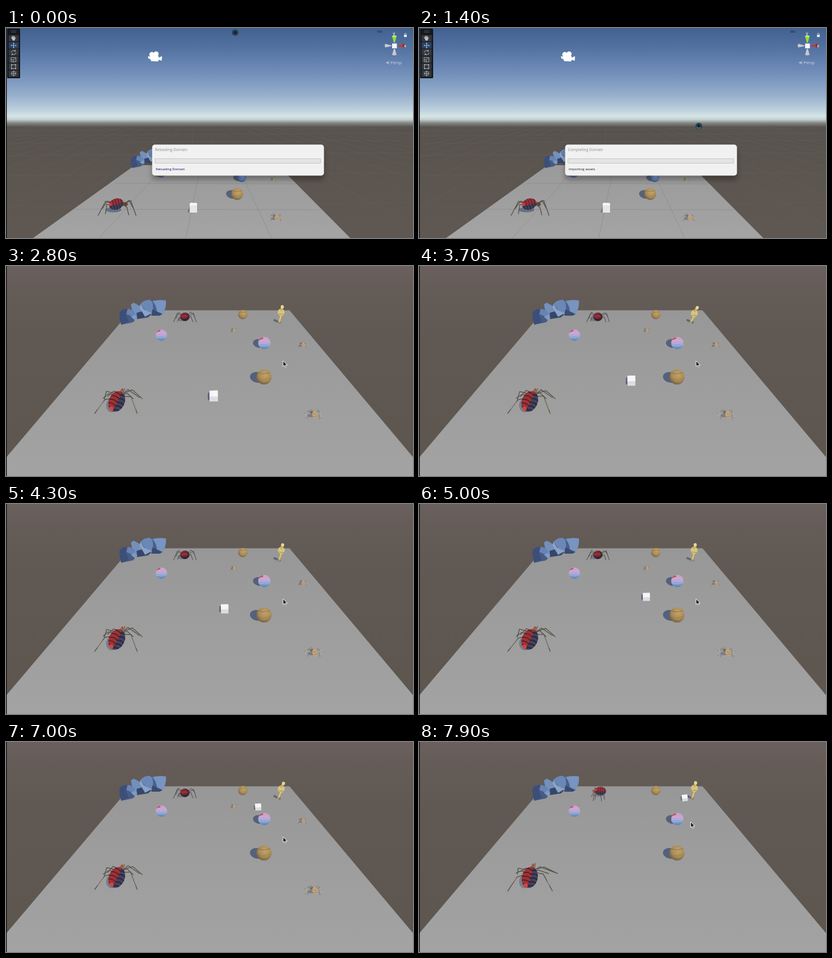
An HTML page for the animation above (8000 ms loop, 720 by 372 pixels).

```html
<!DOCTYPE html>
<html lang="en">
<head>
<meta charset="utf-8">
<title>Editor to play mode</title>
<style>
html, body { margin: 0; width: 100%; height: 100%; overflow: hidden; background: #5f5751; }
svg { display: block; width: 720px; height: 372px; }
text { font-family: "Open Sans", "Noto Sans", sans-serif; }
</style>
</head>
<body>
<svg id="stage" viewBox="0 0 720 372" xmlns="http://www.w3.org/2000/svg"></svg>
<script>
const LOOP = 8000, STEP = 100, CUT = 1900;
const stage = document.getElementById('stage');
const updates = [];

function add(parent, tag, attrs) {
  const el = document.createElementNS('http://www.w3.org/2000/svg', tag);
  for (const k in attrs) el.setAttribute(k, attrs[k]);
  parent.appendChild(el);
  return el;
}
const group = (p, x, y, s = 1, r = 0) =>
  add(p, 'g', { transform: `translate(${x} ${y}) rotate(${r}) scale(${s})` });
const path = (p, d, fill, more) => add(p, 'path', { d, fill, ...more });
const line = (p, d, stroke, w, more) =>
  path(p, d, 'none', { stroke, 'stroke-width': w, 'stroke-linecap': 'round', 'stroke-linejoin': 'round', ...more });
const oval = (p, cx, cy, rx, ry, fill, more) => add(p, 'ellipse', { cx, cy, rx, ry, fill, ...more });
const rect = (p, x, y, width, height, fill, more) => add(p, 'rect', { x, y, width, height, fill, ...more });
const show = (el, on) => el.setAttribute('display', on ? 'inline' : 'none');
const clamp = v => Math.max(0, Math.min(1, v));
const mix = (a, b, k) => a + (b - a) * k;
const ease = k => k * k * (3 - 2 * k);
const span = (t, a, b) => ease(clamp((t - a) / (b - a)));

const defs = add(stage, 'defs', {});
function gradient(tag, id, attrs, stops) {
  const g = add(defs, tag, { id, ...attrs });
  stops.forEach(([offset, c]) => add(g, 'stop', { offset, 'stop-color': c }));
}
const down = { x1: 0, y1: 0, x2: 0, y2: 1 };
const lit = { cx: .58, cy: .35, r: .72 };
gradient('linearGradient', 'sky', down, [
  [0, '#42618f'], [.1, '#5473a2'], [.22, '#7390ba'], [.32, '#97afcc'], [.39, '#bdd0dd'],
  [.42, '#d5e5e6'], [.436, '#c3d0d0'], [.452, '#858885'], [.472, '#57524e'], [.6, '#5a544f'], [1, '#5f5852']]);
gradient('linearGradient', 'dusk', down, [
  [0, '#6a605e'], [.1, '#655c58'], [.22, '#625a55'], [.34, '#605852'], [1, '#5d564f']]);
gradient('linearGradient', 'floor', down, [[0, '#979797'], [.35, '#9c9c9c'], [1, '#a3a3a3']]);
gradient('linearGradient', 'floorEdit', down, [[0, '#9a9a9a'], [1, '#a4a4a4']]);
gradient('radialGradient', 'gold', lit, [[0, '#c2a46c'], [.6, '#a98a55'], [1, '#66563f']]);
gradient('linearGradient', 'candy', down, [[0, '#d0a5c6'], [.4, '#c5a2d2'], [.6, '#8fabda'], [1, '#5d83b2']]);
gradient('radialGradient', 'blueBall', lit, [[0, '#86a5d4'], [.6, '#5f7fb4'], [1, '#374b72']]);
add(add(defs, 'filter', { id: 'soft', x: '-20%', y: '-60%', width: '140%', height: '240%' }),
  'feGaussianBlur', { stdDeviation: 5 });
const bodyClip = add(defs, 'clipPath', { id: 'body' });
oval(bodyClip, 0, 0, 14, 19);
const ballClip = add(defs, 'clipPath', { id: 'ball' });
oval(ballClip, 0, 0, 10, 10);
const SHADOW = '#4f5b75';

// Props shared by both views

function ball(p, x, y, r, kind, cast = true) {
  const g = group(p, x, y, r / 10);
  if (cast) oval(g, -8.5, 2.5, 10, 7, SHADOW, { transform: 'rotate(12)', opacity: .9 });
  oval(g, 0, 0, 10, 10, `url(#${kind})`);
  const c = add(g, 'g', { 'clip-path': 'url(#ball)' });
  if (kind === 'gold') {
    line(c, 'M-8 -6Q-1 -2 8 -6', '#7d6540', .8, { opacity: .7 });
    line(c, 'M-10 2Q0 6 10 1', '#856c45', .6, { opacity: .5 });
  } else if (kind === 'candy') {
    [-5, -1, 3].forEach(v => line(c, `M-10 ${v}Q0 ${v + 4} 10 ${v - 1}`, '#e2b6da', .9, { opacity: .55 }));
    line(c, 'M-8 -6Q-6 -8 -3 -8', '#b84a62', 2.4);
  }
}

// Each leg: hip, knee, foot
function legs(p, rows, color, w, rate, turn) {
  rows.forEach(([hx, hy, kx, ky, fx, fy], i) => {
    const el = line(p, '', color, w);
    updates.push(t => {
      const a = Math.sin(t / rate + i * 1.3) * .7, k = turn(t);
      const x = kx + a * .8 - k * 2, y = ky + a + k * 2;
      const ex = fx + k * (fx > 0 ? 4 : 0), ey = fy + k * (fy > 15 ? 3 : -2);
      el.setAttribute('d', `M${hx - k * 3} ${hy}L${x} ${y}L${ex} ${ey}`);
    });
  });
}

// Red on the left, navy on the right, with dark bands
function stripes(p) {
  const g = add(p, 'g', { 'clip-path': 'url(#body)' });
  oval(g, 0, 0, 14, 19, '#39405c');
  path(g, 'M-15 -20H1Q4 0 -2 20H-15Z', '#a32f33');
  for (let v = -14; v < 20; v += 7) {
    line(g, `M-15 ${v + 2}Q-6 ${v - 3} 1 ${v + 1}`, '#3a2630', 1.7);
    line(g, `M1 ${v + 1}Q8 ${v - 3} 15 ${v + 2}`, '#20253a', 1.7);
    line(g, `M2 ${v - 2}Q7 ${v - 5} 12 ${v - 3}`, '#6b3b4e', 1.2);
  }
  oval(g, -4, 16, 4, 4.5, '#d8433a');
}

const still = () => 0;
const late = t => span(t, 7000, 7500);

function bigSpider(p, x, y) {
  const g = group(p, x, y);
  oval(g, -9, 7, 10, 12, SHADOW, { opacity: .5 });
  legs(g, [
    [8, -13, 28, -20, 45, -5], [9, -12, 20, -21, 40, -7], [10, -9, 25, -9, 36, 21],
    [7, -11, 18, -15, 29, -5], [4, -12, -18, -18, -22, -4], [3, -10, -14, -13, -24, -6],
    [2, -8, -21, -3, -39, 21], [6, -15, -6, -19, -16, -9]
  ], '#55534b', 1.4, 260, late);
  line(g, 'M27 -5L34 14M-24 1L-34 14', '#a1937a', 1);
  const body = add(g, 'g', {});
  oval(body, 9, -17, 4, 5.5, '#8f6a4d', { transform: 'rotate(18 9 -17)' });
  line(body, 'M10 -20L9.500 -23M13 -20L14 -23', '#a43a3a', 1.3);
  stripes(group(body, 0, 0, 1, 23));
  updates.push(t => body.setAttribute('transform', `rotate(${-11 * late(t) + Math.sin(t / 300)})`));
}

function tinySpider(p, x, y, s, rate = 190) {
  const g = group(p, x, y, s);
  oval(g, -6, 2, 6, 3, SHADOW, { opacity: .5 });
  legs(g, [
    [-3, -1, -13, -6, -16, 6], [-3, -2, -8, -8, -17, -2], [-3, 1, -10, 0, -12, 8], [-1, -3, -5, -9, -9, -5],
    [3, -1, 11, -5, 13, 7], [3, -2, 7, -8, 13, -1], [3, 1, 9, 1, 10, 8]
  ], '#817a74', 1, rate, still);
  line(g, 'M-13 -6L-16 4M11 -5L13 5', '#d3c2ad', .9);
  oval(g, -4, -4, 3, 2.5, '#7c6350');
  oval(g, 1.5, 1, 5, 6.4, '#c3a67c', { transform: 'rotate(-25)' });
  line(g, 'M-2 -1Q1 -3 5 1M-1 4Q2 2 6 4', '#8f7354', .8);
  return g;
}

function darkSpider(p, x, y, s = 1) {
  const g = group(p, x, y, s);
  oval(g, -6, 4, 7, 4, SHADOW, { opacity: .5 });
  legs(g, [
    [-4, 0, -13, -6, -20, 9], [-4, -2, -11, -8, -16, 3], [-4, 2, -10, 0, -13, 8], [4, 0, 15, -7, 20, 9],
    [4, -2, 11, -8, 17, -1], [4, 2, 11, 0, 14, 9]
  ], '#4c4a47', 1, 240, still);
  oval(g, 0, 0, 8.3, 7.6, '#4a2630');
  oval(g, -1, -1.5, 6, 5, '#9c2d35');
  line(g, 'M-6 3Q0 0 6 3M-5 -3Q0 -6 5 -3', '#392231', 1.1);
  oval(g, 0, 5.5, 3.5, 1.8, '#2a2330');
  return g;
}

// The same spider seen from the side
function sideSpider(p, x, y) {
  const g = group(p, x, y);
  oval(g, -2, 6, 10, 3, SHADOW, { opacity: .4 });
  legs(g, [
    [-5, 0, -9, -8, -12, 16], [-4, 1, -11, 1, -15, 9], [0, 3, 2, 7, 3, 17], [-5, 1, -7, 5, -9, 14], [5, 2, 7, 6, 8, 14]
  ], '#55514b', 1, 240, still);
  oval(g, -9, -1, 4, 3, '#96523f');
  stripes(group(g, 1, -1, .54, 90));
  return g;
}

const rockArt = [
  ['M20 9L25 6Q36 11 43 19L47 31L30 35L23 24Z', '#7390bd'],
  ['M30 24L44 20L56 27L50 32L31 35Z', '#35466a'],
  ['M37 8Q44 0 53 1Q60 4 60 13L57 24L46 20Z', '#6a88b7'],
  ['M37 8L43 18L56 25L45 31L35 14Z', '#8aa3c8'],
  ['M58 3Q70 0 82 2Q83 16 76 26L66 22Q65 11 58 3Z', '#7894c0'],
  ['M58 3Q65 11 66 22L60 20Z', '#48608e'],
  ['M58 18L76 26L71 29L56 29Z', '#394b70'],
  ['M0 23Q5 16 14 17Q25 17 28 28Q29 38 23 41L3 45Q-1 34 0 23Z', '#475b85'],
  ['M0 23Q5 16 14 17L11 27L16 40L3 45Q-1 34 0 23Z', '#3c4f78'],
  ['M14 17Q25 17 28 28L21 30L12 26Z', '#6884b2'],
  ['M20 31L27 27L31 32L27 37Z', '#7f9ac4']
];
function rocks(p, x, y, s = 1) {
  const g = group(p, x, y, s);
  rockArt.forEach(([d, c]) => path(g, d, c));
}

function dancer(p, x, y, s) {
  const g = group(p, x, y, s);
  line(g, 'M0 0L-9 -4', SHADOW, 4, { opacity: .8 });
  const leg = line(g, '', '#b59c58', 4.2), shin = line(g, '', '#e0cc89', 2);
  const torso = oval(g, 0, 0, 6, 6.5, '#d8c47c'), belt = line(g, '', '#a68f52', 1.2);
  const neck = line(g, '', '#c2aa64', 3.4), head = oval(g, 0, 0, 2.8, 3.2, '#e8d68d');
  updates.push(t => {
    const b = Math.max(0, Math.cos((t - 3700) / 3000 * Math.PI * 2)) ** 2;
    const sway = Math.sin(t / 170) * .4, tx = 3 + sway, ty = mix(-18, -16, b);
    const hx = mix(5, 8, b) + sway, hy = mix(-27.5, -26, b), fx = mix(-1, -3, b);
    leg.setAttribute('d', `M${tx - 1} ${ty + 5}L${fx + 2} -5L${fx} -1`);
    shin.setAttribute('d', `M${tx} ${ty + 5}L${fx + 1} -3`);
    torso.setAttribute('transform', `translate(${tx} ${ty}) rotate(${mix(4, 24, b)})`);
    belt.setAttribute('d', `M${tx - 4} ${ty + 3}L${tx + 4} ${ty + 4}`);
    neck.setAttribute('d', `M${tx} ${ty - 4}L${hx} ${hy}`);
    head.setAttribute('transform', `translate(${hx} ${hy}) rotate(${25 * b})`);
  });
}

// Editor view

const edit = add(stage, 'g', {});
rect(edit, 0, 0, 720, 372, 'url(#sky)');
const far = add(edit, 'g', { opacity: .28 });
for (let i = -14; i <= 14; i++) line(far, `M${330 + i * 18} 172L${330 + i * 145} 372`, '#82786f', .6);
[179, 188, 201, 223, 258, 312].forEach(y => line(far, `M0 ${y + 3}L720 ${y - 2}`, '#82786f', .6));

path(edit, 'M228 243L481 243L609 372L48 372Z', 'url(#floorEdit)');
[[281, 165], [345, 318], [409, 470]].forEach(([a, b]) => line(edit, `M${a} 243L${b} 372`, '#7e7e7e', .6, { opacity: .8 }));
[[192, 513, 276], [118, 557, 322]].forEach(([a, b, y]) => line(edit, `M${a} ${y - 1}L${b} ${y}`, '#7e7e7e', .6, { opacity: .8 }));
rocks(edit, 221, 213, .78);
darkSpider(edit, 320, 240, .8);
ball(edit, 406, 238, 6.5, 'gold');
dancer(edit, 458, 246, .8);
tinySpider(edit, 393, 252, .35);
ball(edit, 274, 257, 8, 'blueBall');
ball(edit, 417, 265, 8, 'blueBall');
tinySpider(edit, 473, 268, .4);
ball(edit, 409, 294, 10.5, 'gold');
tinySpider(edit, 478, 336, .78);
path(edit, 'M325 316L321 326L325 327Z', SHADOW, { opacity: .6 });
rect(edit, 325, 311, 13, 16, '#e6e6e6');
path(edit, 'M325 311L327 309.500L338 310L338 314L325 314Z', '#f7f7f7');

const crawler = group(edit, 195, 312);
oval(crawler, -5, 10, 14, 4.5, SHADOW, { opacity: .7 });
legs(crawler, [
  [-4, 0, -19, -5, -32, 20], [-2, -2, -16, -6, -25, 8], [-5, 3, -17, 0, -19, 17], [15, -1, 26, -6, 35, 20],
  [13, 1, 23, -6, 30, 7], [14, 2, 19, 6, 22, 19]
], '#55534b', 1.4, 1e9, still);
oval(crawler, 16, 0, 4.5, 3.8, '#5c473b');
stripes(group(crawler, 0, 0, .7, 72));

// Camera marker
const cam = add(edit, 'g', { fill: '#fff' });
oval(cam, 258, 47, 4.5, 4.5, '#fff');
oval(cam, 265.5, 46, 4.5, 4.5, '#fff');
rect(cam, 256, 49, 14, 10, '#fff', { rx: 2, transform: 'rotate(4 263 54)' });
path(cam, 'M269 53L276 50L275.500 58L269 56Z', '#fff');
path(cam, 'M251 50L257 51L257 56L252 54Z', '#fff');

// Tool strip
rect(edit, 2, 1, 23, 88, '#16181b', { rx: 1.5 });
line(edit, 'M9 5H18M9 7.500H18', '#596068', .8);
for (let i = 0; i < 6; i++)
  rect(edit, 4.5, 12.5 + i * 12.5, 18, 11.5, i === 1 ? '#2c405f' : '#34373b', { rx: 1 });
const ink = '#b9bdc2';
path(edit, 'M10 18L9 16L11 17L11 14L12 17L13 13.500L14 17L15.500 14.500L15.500 18L17 17L15 22H12Z', ink, { stroke: ink, 'stroke-width': .6 });
line(edit, 'M9 31H18M13.500 26.500V35.500M10 30L9 31L10 32M17 30L18 31L17 32M12.500 27.500L13.500 26.500L14.500 27.500M12.500 34.500L13.500 35.500L14.500 34.500', '#a9c6ef', .9);
line(edit, 'M9.500 43A4 4 0 0 1 16.500 41M17.500 44A4 4 0 0 1 10.500 46M16.500 39V41H14.500M10.500 48V46H12.500', ink, .9);
line(edit, 'M9.500 52.500H17.500V60H9.500ZM9.500 56.500H13V60M13 56.500L16 54', ink, .8);
line(edit, 'M10 65H17V72H10Z', ink, .9);
[[10, 65], [17, 65], [10, 72], [17, 72]].forEach(([x, y]) => oval(edit, x, y, 1, 1, ink));
add(edit, 'circle', { cx: 13.5, cy: 80.5, r: 3.8, fill: 'none', stroke: ink, 'stroke-width': .8 });
line(edit, 'M9 80.500H18M13.500 76V85', ink, .8);

// Axis gizmo
line(edit, 'M657 5.500H665M657 7.500H665', '#27384f', 1);
path(edit, 'M683 14.500Q687 12.500 691 14.500L688 26H686Z', '#8fdd3c');
oval(edit, 687, 14.5, 4, 1.6, '#b4f06b');
path(edit, 'M705 28Q706 31 705 34.500L693 32V31Z', '#c9392c');
oval(edit, 703.5, 31.3, 1.7, 3.3, '#8f2a25');
path(edit, 'M671 28Q669 31 671 34.500L682 32V31Z', '#c9cbce');
path(edit, 'M683 47.500Q687 49.500 691 47.500L688 37H686Z', '#c6c8ca');
rect(edit, 683, 27.5, 8.5, 8.5, '#f5f6f7');
const label = (x, y, s, size, fill, p = edit, more) => {
  const el = add(p, 'text', { x, y, 'font-size': size, fill, ...more });
  el.textContent = s;
  return el;
};
label(684.5, 12, 'y', 7, '#eef2f6', edit, { 'font-weight': 600 });
label(704, 33.5, 'x', 7, '#f3eeee', edit, { 'font-weight': 600 });
rect(edit, 704, 12, 5, 4, '#e3e8ee', { rx: .5 });
line(edit, 'M705 12V10.700A1.500 1.500 0 0 1 708 10.700V12', '#e3e8ee', .8);
line(edit, 'M678 59L672.500 61.500L678 64M673 61.500H678', '#cbd6e4', .8);
label(680.5, 64.3, 'Persp', 7.3, '#cfd9e6');

// Progress dialog
const dialog = add(edit, 'g', {});
rect(dialog, 258, 212, 305, 57, '#000', { rx: 6, opacity: .3, filter: 'url(#soft)' });
rect(dialog, 258.5, 206.5, 304, 55, '#f1f1f1', { rx: 5 });
const title = label(263.5, 218, '', 6.7, '#8a8a8a', dialog);
rect(dialog, 263.5, 231.5, 293, 8, '#e4e4e4', { stroke: '#bdbdbd', 'stroke-width': .8 });
const note = label(265, 252.3, '', 6, '#000', dialog);

// Busy pointer
const busy = add(edit, 'g', {});
oval(busy, 0, 0, 5.6, 5.6, '#17232f');
add(busy, 'circle', { r: 4, fill: 'none', stroke: '#3b5266', 'stroke-width': 1.6 });
const arc = line(busy, 'M0 -4A4 4 0 0 1 4 0', '#2aa3b8', 1.6);

// Play view

const play = add(stage, 'g', {});
rect(play, 0, 0, 720, 372, 'url(#dusk)');
path(play, 'M221 78.500L501.500 78.500L720 338.500V372H0V339.500Z', 'url(#floor)');
rocks(play, 201, 59);
const front = darkSpider(play, 316.5, 90), side = sideSpider(play, 320, 88);
ball(play, 419, 86, 8.3, 'gold', false);
dancer(play, 484, 100, 1);
const swarm = add(play, 'g', {});
tinySpider(swarm, 403, 114, .48, 170);
tinySpider(swarm, 525, 140, .6, 210);
tinySpider(swarm, 545, 263, .98, 230);
ball(play, 275, 122.5, 10, 'candy', false);
ball(play, 457, 136.5, 10.8, 'candy');
ball(play, 456.5, 196.5, 13.3, 'gold');
bigSpider(play, 196, 240);

const box = add(play, 'g', {});
path(box, 'M-6 -8L-10 -4L-10 6L-6 9Z', SHADOW, { opacity: .85 });
rect(box, -7, -9, 14.5, 18.5, '#dcdddf');
path(box, 'M-7 -9L7 -9.500L7.500 1L-7 1Z', '#f6f6f6');

const arrow = path(play, 'M0 0V10L2.400 8L4 11.300L5.600 10.500L4.200 7.400H7.600Z', '#222', { stroke: '#f4f4f4', 'stroke-width': 1 });
rect(stage, 0, 0, 1.3, 372, '#0c0c0c');

// Time, x, y along the floor
const route = [[2300, 366, 237], [3700, 375.5, 203], [5000, 402, 164.5], [6100, 423, 133], [7900, 470, 99]];
function along(t) {
  const n = route.length;
  if (t <= route[0][0]) return route[0].slice(1);
  let i = 0;
  while (i < n - 2 && t > route[i + 1][0]) i++;
  const a = route[i], b = route[i + 1], d = b[0] - a[0], k = clamp((t - a[0]) / d);
  const slope = (j, c) => {
    if (j === 0) return 0;
    const p = route[j - 1], q = route[Math.min(j + 1, n - 1)];
    return (q[c] - p[c]) / (q[0] - p[0]);
  };
  return [1, 2].map(c => {
    const k2 = k * k, k3 = k2 * k;
    return (2 * k3 - 3 * k2 + 1) * a[c] + (k3 - 2 * k2 + k) * d * slope(i, c)
      + (3 * k2 - 2 * k3) * b[c] + (k3 - k2) * d * slope(i + 1, c);
  });
}

function draw(t) {
  const editing = t < CUT;
  show(edit, editing);
  show(play, !editing);
  updates.forEach(f => f(t));

  if (editing) {
    const done = t >= 1300, k = span(t, 0, 700);
    title.textContent = done ? 'Completing Domain' : 'Reloading Domain';
    note.textContent = done ? 'Importing assets' : 'Reloading Domain';
    note.setAttribute('fill', done ? '#111' : '#05056b');
    show(dialog, t < 1600);
    busy.setAttribute('transform', `translate(${mix(405.5, 495, k)} ${mix(8, 173.5, k)})`);
    arc.setAttribute('transform', `rotate(${t * .36})`);
    show(arc, t >= 100);
    return;
  }
  const [x, y] = along(t), s = mix(.7, 1.05, clamp((y - 99) / 138));
  const squat = mix(.88, 1, clamp((y - 165) / 40));
  box.setAttribute('transform', `translate(${x} ${y}) rotate(${-5 * span(t, 6200, 7800)}) scale(${s} ${s * squat})`);
  show(front, t < 7100);
  show(side, t >= 7100);
  show(swarm, t < 7100);
  const m = span(t, 7400, 7800);
  arrow.setAttribute('transform', `translate(${mix(490, 480.5, m)} ${mix(168, 141.5, m)})`);
}

function frame() {
  draw(Math.floor(performance.now() % LOOP / STEP) * STEP);
  requestAnimationFrame(frame);
}
frame();
</script>
</body>
</html>
```
